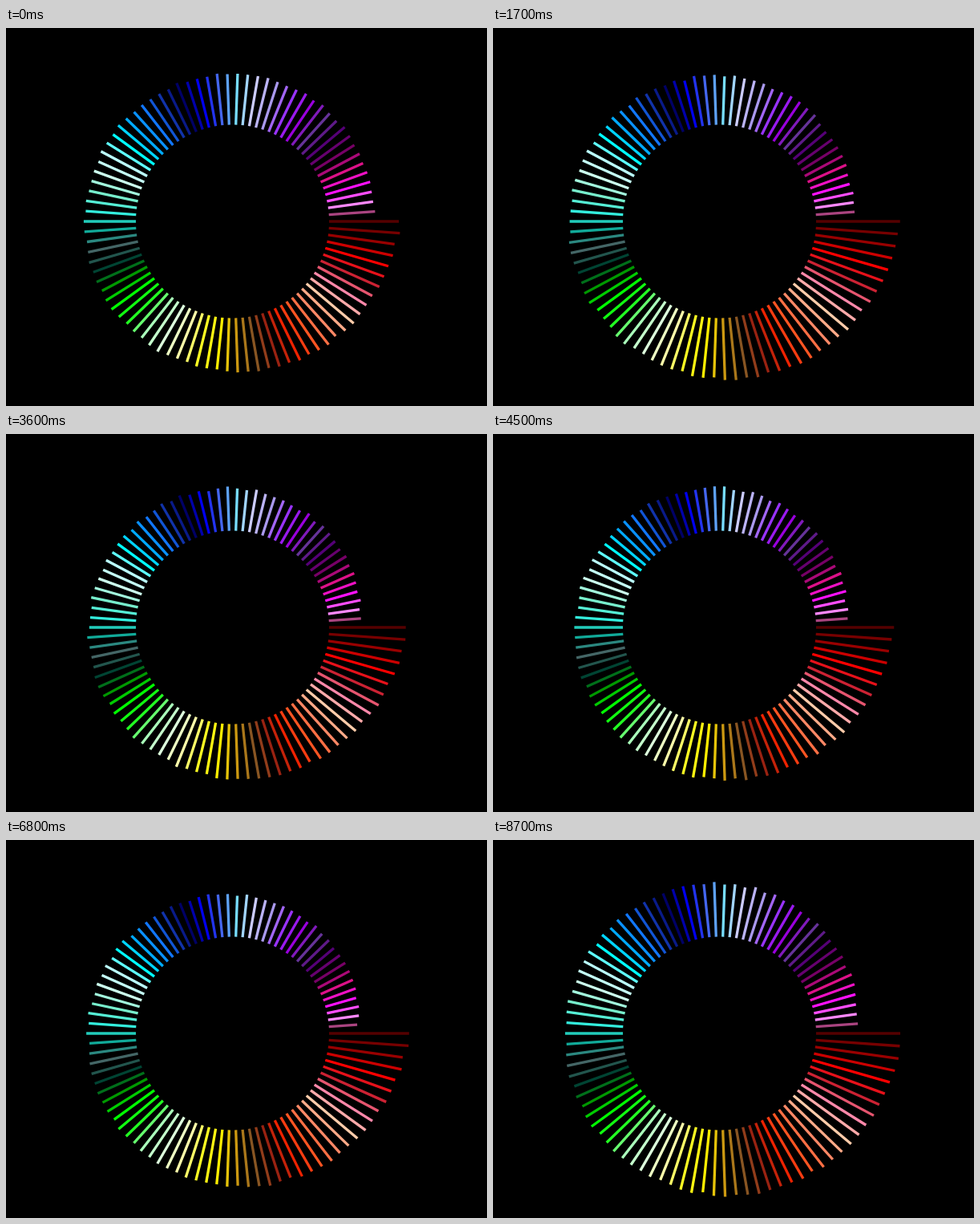
An HTML page for the animation above (8800 ms loop, 600x471 px).

```html
<!DOCTYPE html>
<html lang="en">
<head>
<meta charset="utf-8">
<title>Spectrum ring</title>
<style>
  html, body { margin: 0; width: 100%; height: 100%; overflow: hidden; background: #000; }
  svg { display: block; width: 100%; height: 100%; }
</style>
</head>
<body>
<svg id="stage" viewBox="0 0 600 471"></svg>
<script>
const LOOP = 8800, STEP = 100;
const BARS = 90, CX = 282.5, CY = 241, INNER = 120.5, MAX = 105;
const PEAK = 15, SHAKE = 2;

// Palette clockwise from the right, one stop for every second bar
const palette = (
  '500 900 f00 c23 f8a fca f86 f52 e20 921 852 c91 fe0 ff2 ffa ' +
  'dfd afb 2f2 0f0 090 043 466 1a9 3ed 7ec cfe bff 0ff 0af 17f ' +
  '13a 006 00e 46e 7df ccf a9e 93f 90d 639 507 706 d18 f1f f8f'
).split(' ').map(hex => [...hex].map(d => parseInt(d, 16) * 17));

// Lift of the bass and treble ends between beats
const moods = [
  { at: 0, bass: -11, treble: 9 },
  { at: 1700, bass: 4, treble: 0 },
  { at: 2800, bass: -5, treble: -9 },
  { at: 4500, bass: -2, treble: -8 },
  { at: 5500, bass: 8, treble: 10 },
  { at: 6800, bass: 0, treble: -10 },
  { at: 8700, bass: 9, treble: 6 }
];

const mix = (a, b, u) => a + (b - a) * u;

function colour(k) {
  const a = palette[k >> 1], b = palette[(k + 1 >> 1) % palette.length];
  return `rgb(${a.map((v, i) => Math.round((v + b[i]) / 2))})`;
}

// Average spectrum: steep bass, long plateau, falling treble
const profile = k => 62 + 38 * Math.exp(-k / 18) - 16 * (k / BARS) ** 6;

function noise(a, b) {
  const s = Math.sin(a * 12.9898 + b * 78.233) * 43758.5453;
  return (s - Math.floor(s)) * 2 - 1;
}

const stage = document.getElementById('stage');

const bars = Array.from({ length: BARS }, (_, k) => {
  const a = k * 2 * Math.PI / BARS, cos = Math.cos(a), sin = Math.sin(a);
  const line = document.createElementNS(stage.namespaceURI, 'line');
  line.setAttribute('x1', CX + INNER * cos);
  line.setAttribute('y1', CY + INNER * sin);
  line.setAttribute('stroke', colour(k));
  line.setAttribute('stroke-width', 3.3);
  stage.appendChild(line);
  return { line, cos, sin, base: profile(k) };
});

function draw(time) {
  const t = Math.floor(time % LOOP / STEP) * STEP;
  const i = moods.findLastIndex(m => m.at <= t);
  const from = moods[i], to = moods[(i + 1) % moods.length];
  const gap = (to.at || LOOP) - from.at;
  const u = (t - from.at) / gap;

  // Beats rise fast and fade slowly
  const beats = gap >= 1300 ? 2 : 1;
  const beat = Math.sin(Math.PI * (u * beats % 1) ** 0.6) ** 2;
  const bass = mix(mix(from.bass, to.bass, u), PEAK, beat);
  const treble = mix(mix(from.treble, to.treble, u), PEAK, beat);

  bars.forEach(({ line, cos, sin, base }, k) => {
    const lift = mix(bass, treble, k / BARS) + SHAKE * noise(k, t / STEP);
    const r = INNER + Math.min(MAX, base + lift);
    line.setAttribute('x2', CX + r * cos);
    line.setAttribute('y2', CY + r * sin);
  });
}

const start = performance.now();
function tick() {
  draw(performance.now() - start);
  requestAnimationFrame(tick);
}
tick();
</script>
</body>
</html>
```
